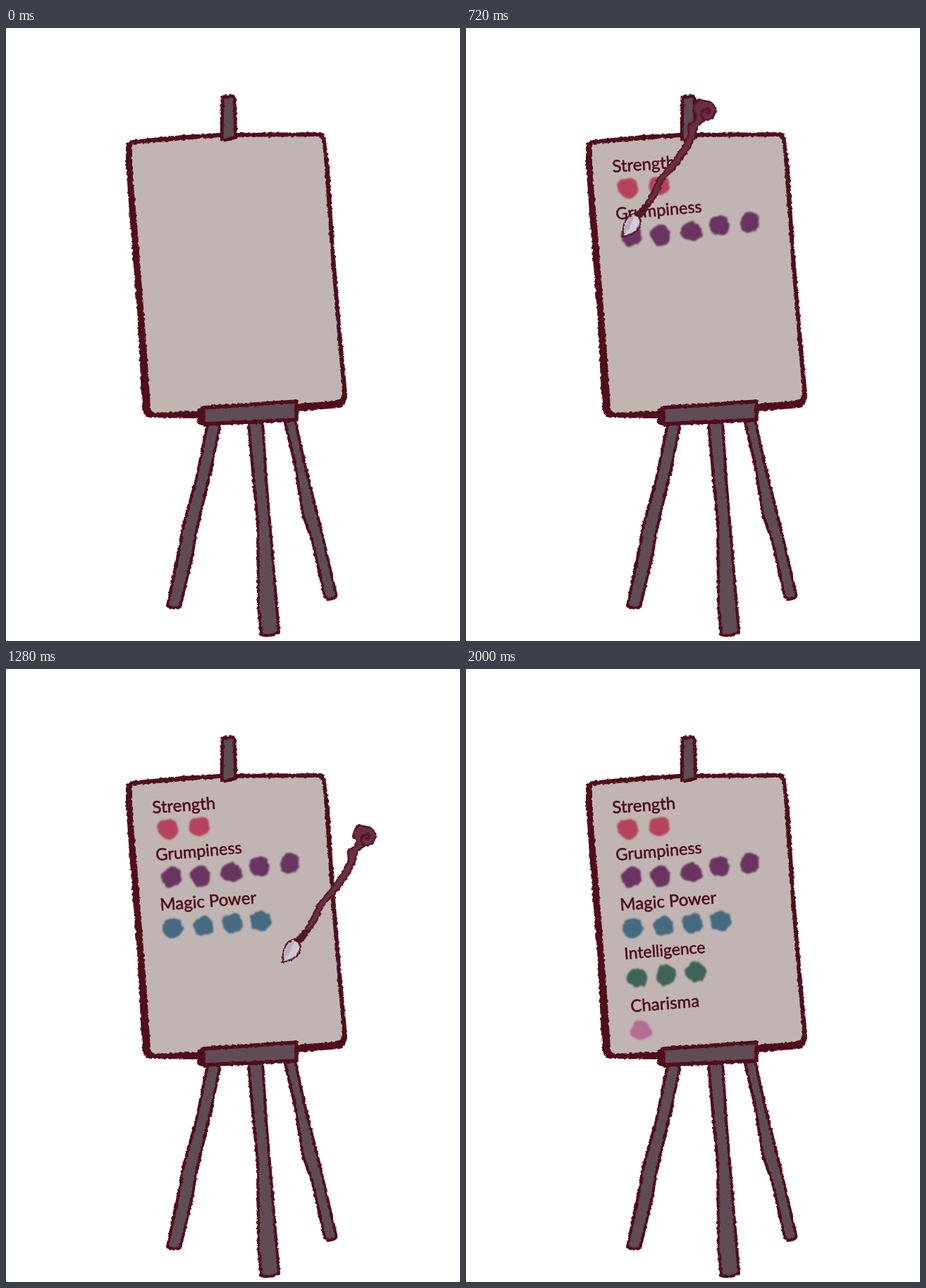
Recreate the animation shown at these times as an HTML page. Size 644 by 870 pixels, loop 2080 ms.

```html
<!DOCTYPE html>
<html lang="en">
<head>
<meta charset="utf-8">
<title>Character sheet easel</title>
<style>
  html, body { margin: 0; width: 100%; height: 100%; overflow: hidden; background: #fff; }
  svg { display: block; width: 100%; height: 100%; }
  .ink { fill: #500d1b; }
  .wood { fill: #604c55; stroke: #500d1b; stroke-linejoin: round; }
  text {
    font-family: Lato, "Open Sans", sans-serif;
    fill: #500d1b; stroke: #500d1b; stroke-width: .6; stroke-linejoin: round;
  }
  #brush { stroke: #561827; stroke-linejoin: round; stroke-linecap: round; }
</style>
</head>
<body>
<svg viewBox="0 0 644 870">
  <defs>
    <filter id="rough" filterUnits="userSpaceOnUse" x="0" y="0" width="644" height="870" color-interpolation-filters="sRGB">
      <feTurbulence type="fractalNoise" baseFrequency=".22" numOctaves="2" seed="4"/>
      <feDisplacementMap in="SourceGraphic" scale="4" xChannelSelector="R" yChannelSelector="G"/>
    </filter>
    <filter id="paint" filterUnits="userSpaceOnUse" x="0" y="0" width="644" height="870" color-interpolation-filters="sRGB">
      <feTurbulence type="fractalNoise" baseFrequency=".09" numOctaves="2" seed="9"/>
      <feDisplacementMap in="SourceGraphic" scale="8" xChannelSelector="R" yChannelSelector="G"/>
      <feGaussianBlur stdDeviation=".9"/>
    </filter>
    <!-- Painted area on either side of the brush, relative to its tip -->
    <clipPath id="paintedLeft"><path d="M-700-900H35L27-40 22-20 14 6 0 24V900H-700Z"/></clipPath>
    <clipPath id="paintedRight"><path d="M900-900H40L34-60 28-40 8-20-6-5-8 20V900H900Z"/></clipPath>
  </defs>

  <g filter="url(#rough)">
    <g class="wood" stroke-width="4">
      <path d="M286 562H304L291 625 270 715 264 750 247 822Q236 825 229 820L247 735 250 712 270 640Z"/>
      <path d="M344 560H364L369 640 377 735 387 857Q375 865 362 861L358 820 357 700 351 640Z"/>
      <path d="M395 556H410L424 620 444 700 469 807Q462 811 456 811L452 806 435 730 421 690 410 620Z"/>
    </g>
    <path class="ink" d="M170 168Q171 160 178 159L250 152 303 149 446 148Q452 149 453 154L459 200 465 300 473 400 484 520Q484 532 475 539L412 544 275 554 205 553Q196 551 194 542L192 520 186 400 177 290 170 190Z"/>
    <path fill="#c1b5b4" d="M179 165L240 160 303 155 443 154Q448 155 449 160L452 200 459 300 467 400 477 515Q478 526 468 529L414 533 275 543 212 546Q206 545 205 540L200 460 193 370 186 280 179 200Z"/>
    <path class="wood" stroke-width="5" d="M307 99Q308 97 311 98L320 96Q324 97 324 100L326 155 310 159Q306 159 306 155Z"/>
    <path class="ink" d="M271 543Q272 538 282 537L284 565Q271 564 271 556Z"/>
    <path class="wood" stroke-width="5.5" d="M279 539L412 530 412 556 281 562Z"/>
  </g>

  <g id="rows"></g>

  <g id="brush">
    <g transform="translate(-362 -201)" filter="url(#rough)">
      <path fill="#6b3040" stroke-width="2.6" d="M383 168L397 150 407 132 411 121 431 97 447 74 456 57 455 43 466 36 467 29 462 20 469 7 488 10 495 20 490 33 477 36 468 45 466 56 458 74 438 102 419 122 414 136 401 156 391 171Z"/>
      <path fill="none" stroke-width="3.6" d="M477 34C470 26 477 18 484 20 489 23 484 28 481 25"/>
      <path fill="#4d1828" stroke-width="2" d="M381 169L395 154 399 157 387 173Z"/>
      <path fill="#d3cad3" stroke-width="2.4" d="M362 201L364 184C367 174 373 170 378 169Q387 172 388 180C387 191 377 199 362 201Z"/>
      <path fill="#b9acb9" stroke="none" d="M365 197L366 185C369 176 373 172 378 171Q376 186 365 197Z"/>
    </g>
  </g>
</svg>

<script>
const STEP = 80, STEPS = 26;

// Each row is painted from step `from` to step `to`, alternating in direction.
const rows = [
  { text: "Strength", x: 208, y: 205, tilt: -4.2, size: 24, color: "#b54360", from: 1, to: 4,
    dots: [[230, 228], [274, 224]] },
  { text: "Grumpiness", x: 213, y: 272, tilt: -5, size: 23.5, color: "#6a3460", from: 5, to: 9,
    dots: [[235, 296], [276, 294], [320, 289], [360, 281], [403, 276]] },
  { text: "Magic Power", x: 219, y: 343, tilt: -4.4, size: 24, color: "#466a80", from: 10, to: 14,
    dots: [[237, 368], [280, 365], [321, 361], [361, 358]] },
  { text: "Intelligence", x: 225, y: 412, tilt: -4.6, size: 23, color: "#3f6358", from: 15, to: 19,
    dots: [[243, 438], [283, 434], [325, 430]] },
  { text: "Charisma", x: 234, y: 487, tilt: -4.6, size: 24, color: "#b76c93", from: 20, to: 24,
    dots: [[248, 513]] }
];

// Brush tip at each step, starting with step 1
const tips = [
  [215, 232], [258, 222], [312, 197], [362, 201],
  [400, 240], [398, 285], [338, 270], [278, 287], [222, 296],
  [213, 345], [238, 362], [290, 350], [345, 346], [399, 357],
  [421, 395], [392, 416], [334, 424], [275, 441], [222, 446],
  [216, 474], [238, 496], [285, 486], [335, 440], [377, 383]
];

const brush = document.getElementById("brush");

function add(parent, tag, attrs) {
  const el = document.createElementNS("http://www.w3.org/2000/svg", tag);
  for (const key in attrs) el.setAttribute(key, attrs[key]);
  return parent.appendChild(el);
}

const move = (x, y) => `translate(${x} ${y})`;

// The outer group carries the clip along with the tip; the inner one cancels the shift.
rows.forEach((row, i) => {
  row.clip = i % 2 ? "url(#paintedRight)" : "url(#paintedLeft)";
  row.outer = add(document.getElementById("rows"), "g", {});
  row.inner = add(row.outer, "g", {});
  const paint = add(row.inner, "g", { fill: row.color, filter: "url(#paint)" });
  row.dots.forEach(([cx, cy]) => add(paint, "circle", { cx, cy, r: 14.3 }));
  add(row.inner, "text", {
    "font-size": row.size,
    transform: `${move(row.x, row.y)} rotate(${row.tilt})`
  }).textContent = row.text;
});

function draw(step) {
  const tip = tips[step - 1];
  brush.style.display = tip ? "" : "none";
  if (tip) brush.setAttribute("transform", move(...tip));

  for (const row of rows) {
    const [x, y] = step < row.to && tip ? tip : [0, 0];
    row.outer.style.display = step < row.from ? "none" : "";
    row.outer.setAttribute("transform", move(x, y));
    row.outer.setAttribute("clip-path", step < row.to ? row.clip : "none");
    row.inner.setAttribute("transform", move(-x, -y));
  }
}

let shown = -1;
function tick() {
  const step = Math.floor(performance.now() / STEP) % STEPS;
  if (step !== shown) draw(shown = step);
  requestAnimationFrame(tick);
}
tick();
</script>
</body>
</html>
```
